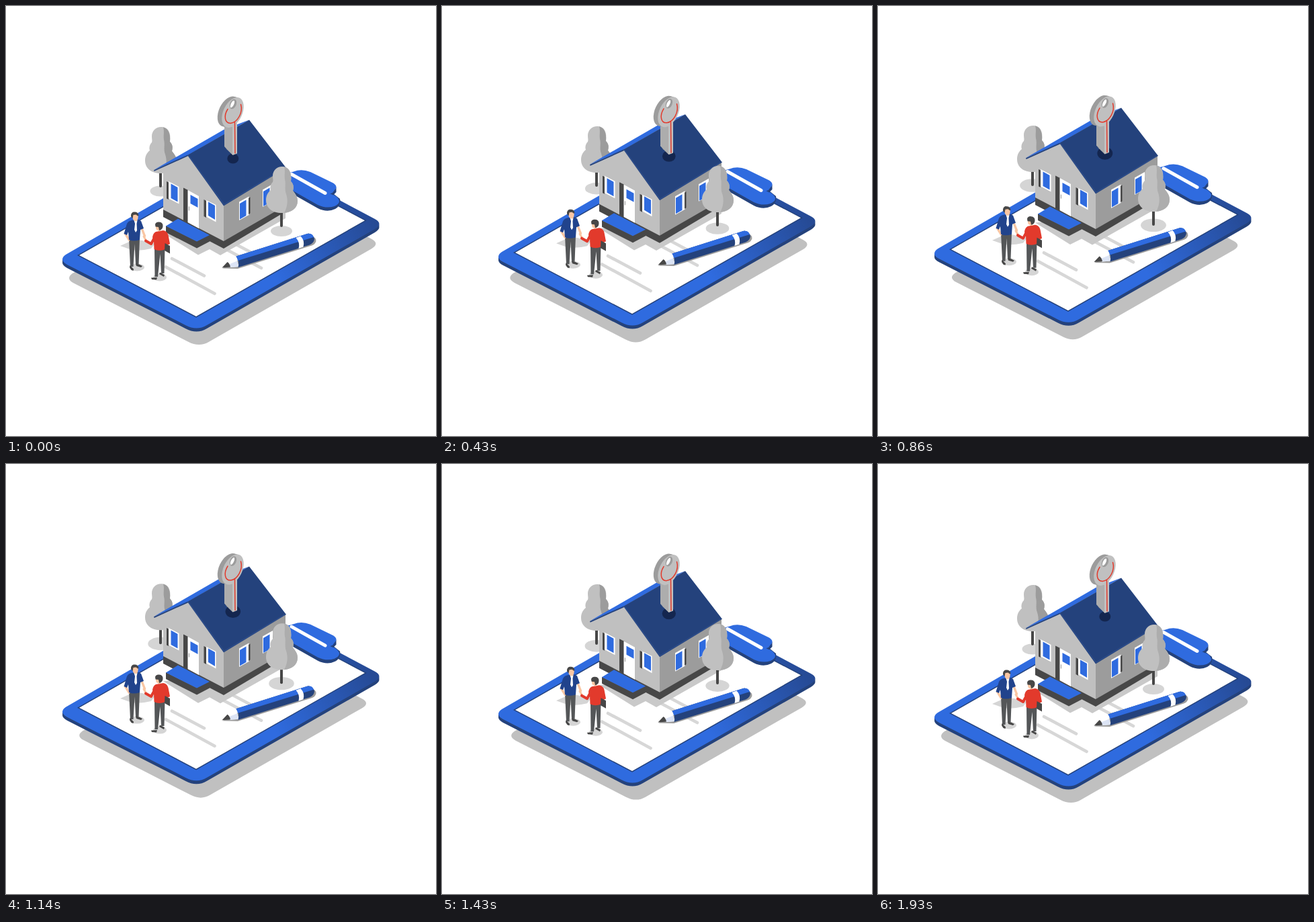
Recreate the animation shown at these times as an HTML page. Size 640x640 px, loop 2 s.

```html
<!DOCTYPE html>
<html lang="en">
<head>
<meta charset="utf-8">
<title>House on a clipboard</title>
<style>
  html, body { margin: 0; width: 100%; height: 100%; overflow: hidden; background: #fff; }
  svg { display: block; width: 100%; height: 100%; }
  .navy { fill: #24427c; } .blue { fill: #2f6bdf; } .white { fill: #fff; }
  .light { fill: #c0c0c0; } .mid { fill: #9c9c9c; } .dark { fill: #474747; }
  .shade { fill: #d5d5d5; } .skin { fill: #f9c6a3; } .red { fill: #e23a2c; }
  .trousers { fill: #545658; } .shirt { fill: #21438c; }
  .line { fill: none; stroke-linecap: round; stroke-linejoin: round; }
</style>
</head>
<body>
<svg viewBox="0 0 640 640">
  <defs>
    <linearGradient id="frameFill" gradientUnits="userSpaceOnUse" x1="390" y1="390" x2="535" y2="300">
      <stop offset="0" stop-color="#2f6bdf"/>
      <stop offset="1" stop-color="#264a94"/>
    </linearGradient>
    <path id="slab" d="M89 370L345 222Q357 216 370 222L549 317Q562 324 549 332L299 475Q284 484 267 475L91 385Q78 378 89 370Z"/>
    <g id="tree">
      <path d="M230 240V268" class="line" stroke="#474747" stroke-width="4"/>
      <path class="light" d="M231 180C223 180 217 186 217 194C217 198 218 200 217 203C213 207 213 212 214 215C209 219 207 224 207 230C207 242 217 249 230 249C244 249 254 243 254 231C254 224 250 220 247 216C249 209 247 205 244 202C246 188 241 180 231 180Z"/>
      <path fill="currentColor" d="M234 180.500C242 182 245 191 244 202C247 205 249 209 247 216C250 220 254 224 254 231C254 242 245 248 234 249C239 240 240 230 237 221C234 213 237 207 235 199C234 192 236 187 234 180.500Z"/>
    </g>
  </defs>

  <use id="boardShadow" href="#slab" class="light"/>

  <g data-lift="9">
    <use href="#slab" y="5" class="navy"/>
    <use href="#slab" y="2.500" class="navy"/>
    <use href="#slab" fill="url(#frameFill)"/>
    <path class="white" stroke="#24427c" stroke-width="3" paint-order="stroke" d="M109 371L360 227.500L534 319.300L283 462Z"/>
    <path class="line" stroke="#d7d7d7" stroke-width="4.600" d="M247 376L295 401.500M238 388.500L310.500 428M299 347L380 390M322 344L369 369"/>

    <path class="navy" d="M395 262L464 301Q478 308 490 302Q499 297 497 287L478 272L400 250Z"/>
    <path class="blue" d="M395 257L464 296Q477 302 489 298Q502 292 491 283L440 256Z"/>
    <path class="navy" d="M478 270H491.500V277L487 281.500L478 277Z"/>
    <path class="blue" d="M408 252L428 246.500Q440 242 453 247L487 263.500Q495 269 489 274L486 278L470 284L420 268Z"/>
    <path class="line" stroke="#fff" stroke-width="5" d="M425 250.500L475 278.500"/>
  </g>

  <ellipse class="shade" id="leftTreeShade" cx="230"/>
  <use href="#tree" color="#9c9c9c" data-lift="2"/>

  <path data-lift="16" fill="#c9c9c9" d="M234 338L286 370.500L303 362L319 371L416 316V290L324 330Z"/>

  <g data-lift="18.400">
    <path class="light" d="M234 238L270 221L324 294V352L234 305Z"/>
    <path class="mid" d="M324 294L416 240V299L324 352Z"/>
    <path class="dark" d="M234 303L324 350V361L234 314Z"/>
    <path class="dark" d="M324 350L416 297V306L324 361Z"/>

    <path class="dark" d="M239 261L242 262.500V288L239 286.500ZM264 270.500L271 274V323L264 319ZM294.500 288L298 290V315L294.500 313Z"/>
    <path class="white" d="M242 261L257.500 269V294.500L242 286.500ZM270.500 274L287 283V331L270.500 322ZM298 289L312.500 296V321.500L298 313.500Z"/>
    <path class="blue" d="M245.500 264.500L255.500 270V291.500L245.500 286ZM274.500 281L285.500 287V300L274.500 294ZM301 291.500L311 297V318L301 312Z"/>
    <path class="line" stroke="#aaa" stroke-width="1.200" d="M272.500 299V304"/>
    <path class="white" d="M347 291.500L361.500 283.500V311L347 319ZM382 273.500L397 265V291L382 299Z"/>
    <path class="blue" d="M348 294L357.500 288.500V312L348 317.500ZM383 276L392.500 270.500V293L383 298Z"/>
    <path class="dark" d="M361 286L363.500 284.500V308.500L361 310Z"/>

    <path class="dark" d="M238 327L284 350V360.500L238 337Z"/>
    <path class="dark" d="M284 350L303 340V350.500L284 360.500Z"/>
    <path class="blue" d="M238 327.500L256 316.500L303 341L284 350.500Z"/>

    <path class="blue" d="M220 244L326 183L362 169.500L270 222.500Z"/>
    <path class="line" stroke="#24427c" stroke-width="1.800" d="M221 244.800L270 222.800"/>
    <path class="navy" d="M270 222L362 169.500L417 241L324 297.500Z"/>
    <path class="line" stroke="#3a5da0" stroke-width=".6" d="M272 223L324.500 295.500L415 241"/>
  </g>

  <ellipse id="keyhole" fill="#14264f" cx="337.800"/>
  <g data-lift="1.600">
    <path class="mid" d="M325 176L333 178V217L329 214L325 208.500Z"/>
    <path class="light" d="M331 176L344 172V219.500L337.500 222L331 215.500Z"/>
    <path fill="#adadad" d="M325 178L331 180V215L325 209Z"/>
    <path class="mid" d="M331 180L337 180V221L331 215.500Z" opacity=".55"/>
    <ellipse class="mid" cx="331" cy="157" rx="14" ry="24" transform="rotate(25 331 157)"/>
    <ellipse class="mid" cx="334" cy="157.700" rx="14" ry="24" transform="rotate(25 334 157.700)"/>
    <ellipse class="light" cx="337.500" cy="158.500" rx="14" ry="24" transform="rotate(25 337.500 158.500)"/>
    <ellipse class="mid" cx="338" cy="146" rx="4.700" ry="7.600" transform="rotate(22 338 146)"/>
    <ellipse class="white" cx="337" cy="146" rx="2.200" ry="5.800" transform="rotate(25 337 146)"/>
    <path class="line" stroke="#e23a2c" stroke-width="1.500" d="M349.500 146.500C353 158 345 173 334.500 174.500C325 175 324 163 330 153.500M340.500 173L341 219"/>
  </g>

  <ellipse class="shade" id="rightTreeShade" cx="410"/>
  <use href="#tree" x="180" y="59" color="#adadad" data-lift="2"/>

  <g data-lift="8.800">
    <path class="mid" d="M322 390.500L346 378L452 343Q462 343 461.500 350Q460 355 455 356.500L345 391Z"/>
    <path class="white" d="M329 381L342.500 372.500L346.500 388L333 389Z"/>
    <path fill="#dce4f5" d="M333 384L344 379.500L346.500 388L333 389Z"/>
    <path class="dark" d="M321.500 389.500L329.500 381Q333 383 334 388.500Z"/>
    <path class="navy" d="M342.500 372.500L450 338.500Q458 340 459 347Q458 353 452 355.500L345.500 389Q348 380 342.500 372.500Z"/>
    <path class="blue" d="M342.500 372.500L448 339Q456 337.500 458 344L345 379Q344.500 376 342.500 372.500Z"/>
    <path class="white" d="M431.500 345L438.500 342.500Q445 349 442.500 358.500L435.500 361Q438 352 431.500 345Z"/>
  </g>

  <g data-lift="8.600">
    <path class="shade" d="M170 357L192 347L222 353L216 361Q200 365 187 363Z"/>
    <ellipse class="shade" cx="195" cy="389" rx="11" ry="5.500"/>
    <ellipse class="shade" cx="229" cy="404" rx="10" ry="5.500"/>

    <path class="trousers" d="M183 346H199L197.500 384.500H193L191.500 354L189.500 388H185Z"/>
    <path class="dark" d="M184.500 386L190 391.500L189.500 394L186.500 393L184 389ZM193 383.500L198 384.500L203 387L201 389L194 387Z"/>
    <path class="line" stroke="#f9c6a3" stroke-width="3.400" d="M177.500 339L183 348M202 331L206.500 342.500"/>
    <path class="shirt" d="M187 319L197 318L201 320L205 331L200 333L199 348Q190 351 183 348L182 336L180 341L175.500 339L180 324Q182 320 187 319Z"/>
    <path class="white" d="M190.500 319H195.500L194.500 324L195 334L193 337L191 333L192 324Z"/>
    <path class="skin" d="M188.500 310H196.500Q197.500 319 193.500 320.500L190 319Q187.500 316 188.500 310Z"/>
    <path class="dark" d="M186 311Q187 306 191.500 306.500Q197 306.500 197.500 312L196 312.500L193.500 310.500L189.500 311L188.500 316Q185.500 314 186 311Z"/>

    <path class="trousers" d="M221 359H236.500L235.500 398H231L229.500 369L226 403H221.500Z"/>
    <path class="dark" d="M216 404.500L225 404L224 407.500L217 407ZM229 396.500L236 400L235 403L228 399Z"/>
    <path class="line" stroke="#f9c6a3" stroke-width="3" d="M205 343L208 348"/>
    <path class="line" stroke="#e23a2c" stroke-width="4" d="M208 349.500L216 354L222 343"/>
    <path class="red" d="M223 336L234 334Q240 335 241.500 341L244 354L238 357L237 362Q228 366 220.500 362L220 350L218 344Q219 338 223 336Z"/>
    <path class="dark" d="M236.500 353L244 357V368.500L236 364Z"/>
    <path class="skin" d="M223 327L231 328L230 335Q227 336 226 334Q222.500 334 223 327Z"/>
    <path class="dark" d="M222 325Q223 321 228 321.500Q234 322 233.500 328Q233 333 228 334L227 329L222.500 328.500Z"/>
  </g>
</svg>
<script>
  const PERIOD = 2000, STEPS = 28;
  const byId = id => document.getElementById(id);
  const mix = (from, to, p) => from + (to - from) * p;

  const lifted = [...document.querySelectorAll('[data-lift]')]
    .map(node => ({ node, lift: Number(node.dataset.lift) }));

  function setEllipse(id, cy, rx, ry) {
    const node = byId(id);
    node.setAttribute('cy', cy);
    node.setAttribute('rx', rx);
    node.setAttribute('ry', ry);
  }

  function draw(time) {
    const step = Math.floor(((time + 4) % PERIOD) / PERIOD * STEPS);
    const p = (1 - Math.cos(2 * Math.PI * (step + 0.5) / STEPS)) / 2;

    for (const { node, lift } of lifted)
      node.setAttribute('transform', `translate(0 ${-lift * p})`);

    // The shadow shrinks as the board floats up.
    byId('boardShadow').setAttribute('transform',
      `translate(${mix(12.7, 34.9, p)} ${mix(39.9, 64.5, p)}) scale(${mix(0.968, 0.9, p)})`);
    setEllipse('leftTreeShade', mix(275.5, 266.8, p), mix(15.5, 19, p), mix(8, 9.8, p));
    setEllipse('rightTreeShade', mix(335, 326, p), mix(16, 19, p), mix(8, 9.8, p));
    setEllipse('keyhole', mix(227, 219, p), mix(8.5, 11.5, p), mix(7.5, 9.5, p));
  }

  function tick() {
    draw(performance.now());
    requestAnimationFrame(tick);
  }
  tick();
</script>
</body>
</html>
```
